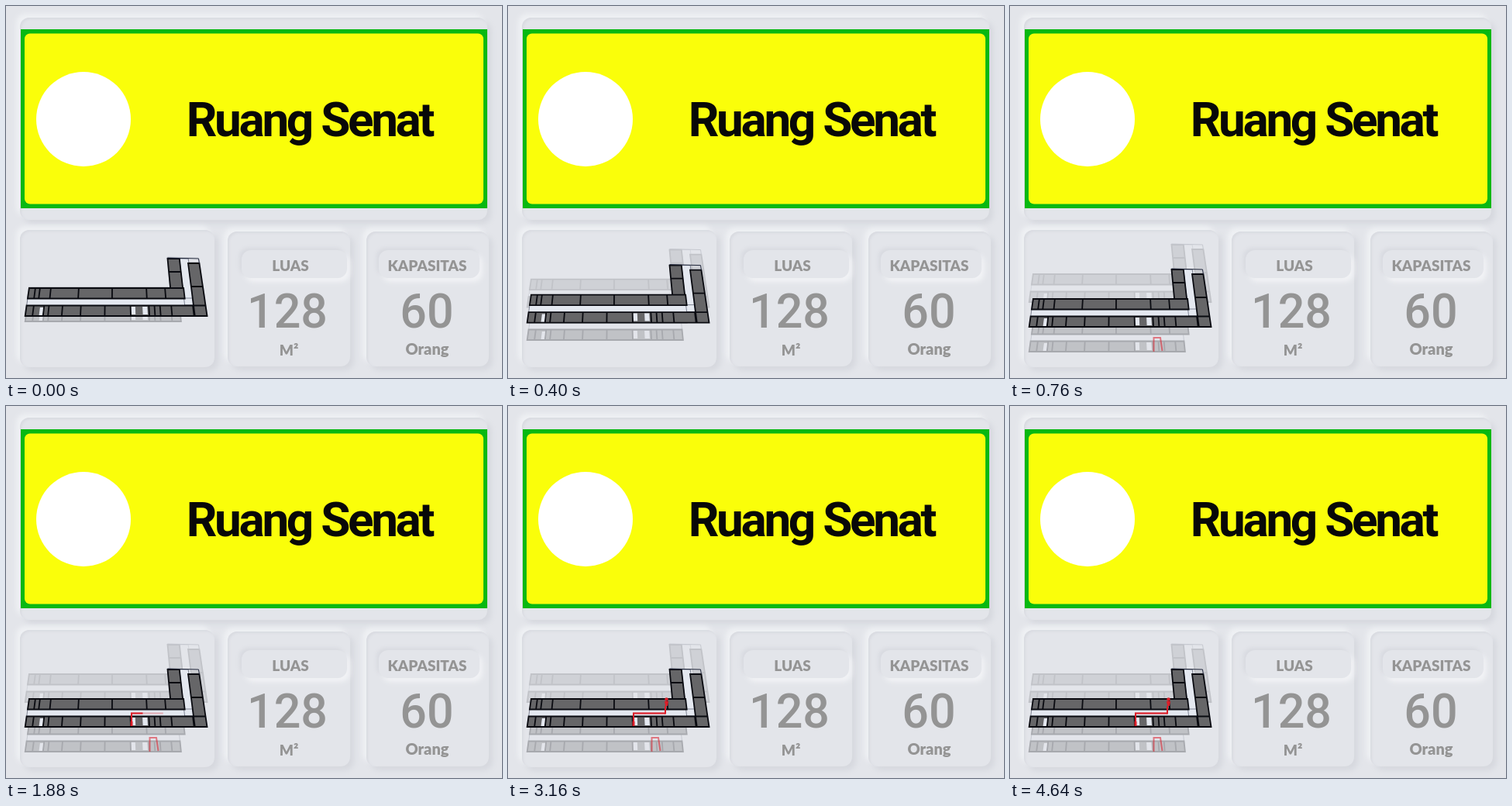
These frames come from a looping animation (640 px wide and 480 px high, 5.12 s). An HTML page:

```html
<!DOCTYPE html>
<html lang="id">
<meta charset="utf-8">
<title>Ruang Senat</title>
<style>
  html, body { margin: 0; width: 100%; height: 100%; overflow: hidden; background: #e3e5ea; }
  .panel, .label { position: absolute; box-sizing: border-box; background: #e3e5ea; border-radius: 12px; }
  .panel { box-shadow: -5px -5px 6px #eff1f4, 5px 5px 7px #d6d8de, inset 2px 2px 3px #d9dbe1; }
  .label { box-shadow: -3px -3px 5px #d8dae0, 4px 5px 6px #f2f3f6; }
  svg { position: absolute; left: 0; top: 0; }
  .caption { font: 900 19px Lato, sans-serif; }
  .value { font: 500 61px Roboto, sans-serif; }
  .title { font: 700 62px Roboto, sans-serif; letter-spacing: -3.3px; }
  .route { fill: none; stroke: #dc1e29; stroke-width: 2; }
</style>
<div class="panel" style="left:18px;top:15px;width:603px;height:261px"></div>
<div class="panel" style="left:18px;top:289px;width:251px;height:177px"></div>
<div class="panel" style="left:286px;top:291px;width:158px;height:174px"></div>
<div class="panel" style="left:465px;top:291px;width:158px;height:174px"></div>
<div class="label" style="left:304px;top:315px;width:136px;height:36px"></div>
<div class="label" style="left:481px;top:315px;width:130px;height:36px"></div>
<svg width="640" height="480" viewBox="0 0 640 480">
  <path fill="#08b812" d="M19 30H621V261H19Z"/>
  <rect x="24" y="35.5" width="592" height="220" rx="7" fill="#fafe0a"/>
  <circle cx="100" cy="146" r="61" fill="#fff"/>
  <text class="title" x="391.5" y="168" text-anchor="middle" fill="#080808">Ruang Senat</text>
  <g text-anchor="middle" fill="#949494">
    <g class="caption">
      <text x="367" y="342">LUAS</text>
      <text x="543.5" y="342">KAPASITAS</text>
      <text x="365" y="451">M²</text>
      <text x="543.5" y="450" font-size="20">Orang</text>
    </g>
    <g class="value">
      <text x="363" y="415">128</text>
      <text x="543" y="415">60</text>
    </g>
  </g>
  <g id="upper" opacity=".15"></g>
  <g id="lower">
    <g id="lowerPlan" opacity=".27"></g>
    <path id="entry" class="route" opacity=".55" pathLength="1" d="M185.5 414V396H194L196.5 413"/>
  </g>
  <g id="main"></g>
  <path id="glow" class="route" opacity=".3" pathLength="1" d="M162 413V396.5H203"/>
  <path id="route" class="route" pathLength="1" d="M162 413V396.5H203"/>
  <path id="turn" class="route" pathLength="1" d="M203 397.5V387"/>
  <path id="start" class="route" d="M162 407V413" style="stroke-width:3"/>
  <g id="marker" fill="#dc1e29">
    <circle cx="204.5" cy="378.5" r="2.2"/>
    <path d="M202 381H207L206 387H203Z"/>
  </g>
</svg>
<script>
const LOOP = 5120;
const $ = id => document.getElementById(id);
const clamp = v => Math.max(0, Math.min(1, v));
const phase = (t, from, to) => clamp((t - from) / (to - from));

// Slight perspective: x spreads out from the middle as y grows.
const px = (x, y) => (140 + (x - 140) * (1 + (y - 377) * 0.0013)).toFixed(1);
const point = (x, y) => px(x, y) + ' ' + y;
const quad = (x1, y1, x2, y2) =>
  `M${point(x1, y1)}L${point(x2, y1)}L${point(x2, y2)}L${point(x1, y2)}Z`;
const row = (xs, top, bottom) =>
  xs.slice(1).map((x, i) => quad(xs[i], top, x, bottom)).join('');
const column = (ys, left, right) =>
  ys.slice(1).map((y, i) => quad(left, ys[i], right, y)).join('');

function plan(tower) {
  const end = tower ? 238 : 222;
  const rooms = row([30, 38, 44, 58, 94, 137, 181, 205, 229], 378, 391.5)
    + row([30, 39, 52, 58, 75, 98, 128, 160, 183, 190, 197, 211, end], 400.5, 414)
    + (tower ? column([340, 357, 378], 212, 228) + column([346, 376, 400.5, 414], 239, 254) : '');
  const hall = quad(30, 391, tower ? 239 : 222, 401)
    + (tower ? quad(228, 340, 240, 400) : '');
  const gaps = quad(47, 403, 51, 413) + quad(161, 402, 166, 412) + quad(175, 402, 181, 412);
  const wall = tower
    ? `<path d="M${point(212, 339)}L${point(254, 340)}L${point(254, 346)}" fill="none" stroke="#20263a"/>` : '';
  return `<path d="${hall}" fill="#e4e8f0" stroke="#3a4055" stroke-width=".6"/>
    <path d="${rooms}" fill="#666668" stroke="#090a10" stroke-width="1.8"/>
    <path d="${gaps}" fill="#e4e8f0"/>${wall}`;
}

$('upper').innerHTML = $('main').innerHTML = plan(true);
$('lowerPlan').innerHTML = plan(false);

const shift = (id, y) => $(id).setAttribute('transform', `translate(0 ${y})`);
const reveal = (id, p) => $(id).setAttribute('stroke-dasharray', `${clamp(p)} 2`);

function draw(now) {
  const t = Math.floor(now % LOOP / 40) * 40;
  const spread = phase(t, 0, 650);
  shift('upper', -15 - 17 * spread);
  shift('main', -14 + 14 * spread);
  shift('lower', -7 + 39 * spread);

  reveal('entry', phase(t, 580, 760));
  const walk = phase(t, 1600, 2120);
  reveal('route', walk);
  reveal('glow', walk * 1.85);
  reveal('turn', phase(t, 2400, 2560));
  $('start').setAttribute('opacity', phase(t, 1600, 1720));
  $('marker').setAttribute('opacity', phase(t, 2920, 3160));
  requestAnimationFrame(draw);
}
requestAnimationFrame(draw);
</script>
</html>
```
